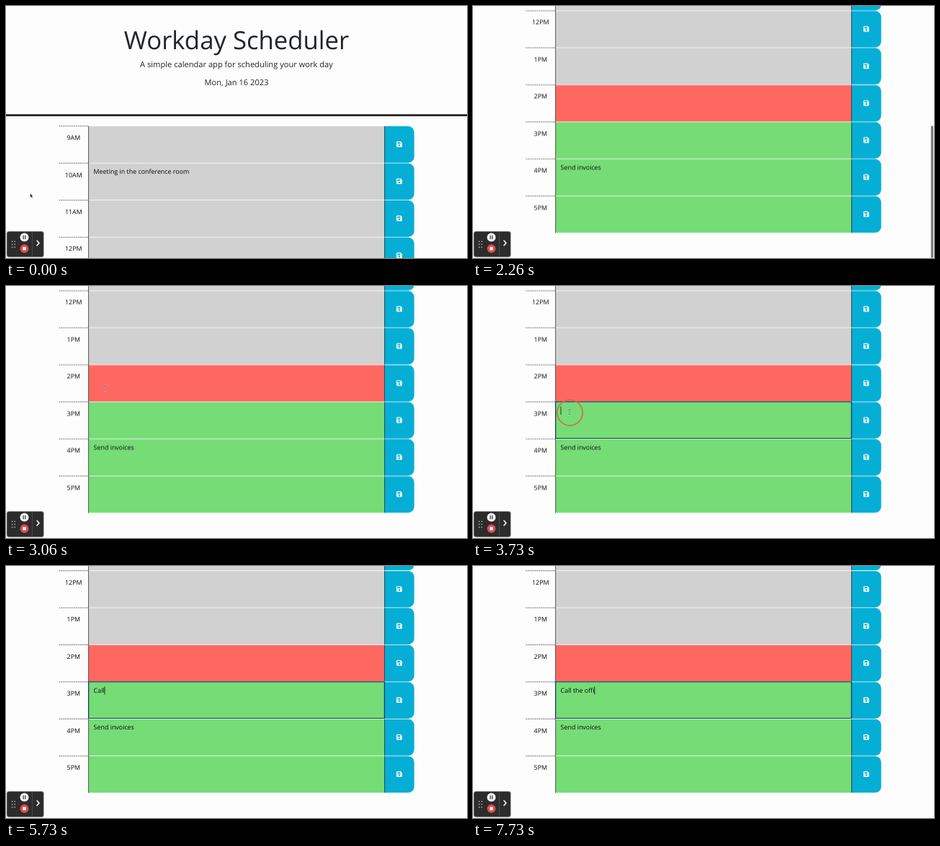
Recreate the animation shown at these times as an HTML page. Size 640x350 px, loop 8000 ms.

```html
<!DOCTYPE html>
<html lang="en">
<head>
<meta charset="utf-8">
<title>Workday Scheduler</title>
<style>
  html, body { margin: 0; width: 100%; height: 100%; overflow: hidden; background: #fdfdfd; }
  svg { display: block; width: 640px; height: 350px; }
  text {
    font: 8.9px "Open Sans", sans-serif;
    fill: #0a0a0a;
    text-rendering: geometricPrecision;
    white-space: pre;
  }
  .mid { text-anchor: middle; }
  h1, .title { font-size: 34.7px; fill: #212529; }
  .lead { font-size: 11.12px; fill: #212529; }

  #page, #arrow, #bar, #beam, #ring, #focus, #caret {
    animation: 8s linear infinite;
  }
  #page  { animation-name: scroll; animation-timing-function: step-end; }
  #arrow { animation-name: arrow; animation-timing-function: step-end; }
  #bar   { animation-name: bar; }
  #beam  { animation-name: beam-move, beam-show; animation-duration: 8s; animation-timing-function: ease-in-out, step-end; }
  #ring  { animation-name: ring; transform-origin: 134.5px 176px; }
  #focus { animation-name: focus; animation-timing-function: step-end; }
  #caret { animation-name: blink; animation-timing-function: step-end; }

  @keyframes scroll { 0% { transform: none; } 28.2%, 100% { transform: translateY(-314.6px); } }
  @keyframes arrow { 0% { opacity: 1; } 28.2%, 100% { opacity: 0; } }
  @keyframes bar {
    0%, 28.19% { opacity: 0; }
    28.2%, 34% { opacity: 1; }
    37.5%, 100% { opacity: 0; }
  }
  @keyframes beam-move {
    0%, 31% { transform: translate(141px, 236px); }
    38%, 40% { transform: translate(137.5px, 142px); }
    43.3%, 100% { transform: translate(134px, 175px); }
  }
  @keyframes beam-show { 0% { opacity: 0; } 31% { opacity: 1; } 67.5%, 100% { opacity: 0; } }
  @keyframes ring {
    0%, 44.9% { opacity: 0; transform: scale(.5); }
    45% { opacity: 1; transform: scale(.6); }
    46.4%, 48.2% { opacity: 1; transform: scale(1); }
    50.5%, 100% { opacity: 0; transform: scale(1); }
  }
  @keyframes focus { 0% { opacity: 0; } 45.8%, 100% { opacity: 1; } }
  @keyframes blink {
    0% { opacity: 0; }
    45.8% { opacity: 1; }
    51.6% { opacity: 0; }
    57.5% { opacity: 1; }
    61.6% { opacity: 0; }
    67.5%, 100% { opacity: 1; }
  }
</style>
</head>
<body>
<svg viewBox="0 0 640 350">
  <defs>
    <path id="save" fill="#fff" fill-rule="evenodd"
      d="M-3-3.9H1.9L3.9-1.9V3a.9 .9 0 0 1-.9 .9H-3a.9 .9 0 0 1-.9-.9V-3a.9 .9 0 0 1 .9-.9Z
         M-2.7-2.7V-.7H1.6V-2.7Z M0 .2a1.2 1.2 0 0 0 0 2.5a1.2 1.2 0 0 0 0-2.5Z"/>
  </defs>

  <g id="page">
    <text class="mid title" x="320" y="60.4">Workday Scheduler</text>
    <text class="mid lead" x="320" y="85">A simple calendar app for scheduling your work day</text>
    <text class="mid lead" x="320" y="110.3">Mon, Jan 16 2023</text>
    <rect y="150.3" width="640" height="2.8" fill="#212529"/>
    <g id="rows"></g>
  </g>

  <rect id="focus" x="114.6" y="160.9" width="410.8" height="50.6" rx=".8" fill="none" stroke="#0d3f68" stroke-width="1.2"/>
  <text id="typed" x="121.6" y="176.1"></text>
  <rect id="caret" x="121.6" y="167.3" width=".8" height="11.3" fill="#111"/>

  <circle id="ring" cx="134.5" cy="176" r="17.7" fill="none" stroke="#d8683a" stroke-width="1.6"/>

  <path id="arrow" d="M33.7 260.4v5.6l1.3-1.1 1 2 1-.5-.9-1.9h1.7Z" fill="#111" stroke="#fff" stroke-width=".5"/>
  <g id="beam" fill="none">
    <path d="M-1.6-3.7Q0-3.7 0-2.6V2.6Q0 3.7-1.6 3.7M1.6-3.7Q0-3.7 0-2.6M0 2.6Q0 3.7 1.6 3.7" stroke="#fff" stroke-opacity=".65" stroke-width="1.5"/>
    <path d="M-1.6-3.7Q0-3.7 0-2.6V2.6Q0 3.7-1.6 3.7M1.6-3.7Q0-3.7 0-2.6M0 2.6Q0 3.7 1.6 3.7" stroke="#333" stroke-width=".6"/>
  </g>

  <rect id="bar" x="635.8" y="166.3" width="3.2" height="183.5" rx="1.6" fill="#7d7d7d"/>

  <g id="recorder">
    <rect x="1" y="313" width="51.4" height="35.8" rx="3" fill="#2c2c2c" stroke="#bbb" stroke-width=".5"/>
    <path d="M36.4 313.4V348.4" stroke="#555" stroke-width=".8"/>
    <path d="M8.6 327h.01M12.2 327h.01M8.6 331h.01M12.2 331h.01M8.6 335h.01M12.2 335h.01"
      stroke="#bbb" stroke-width="1.7" stroke-linecap="round"/>
    <circle cx="25.5" cy="321.3" r="6" fill="#f4f4f4"/>
    <path d="M24.2 318.8v5M26.8 318.8v5" stroke="#2c2c2c" stroke-width="1.2"/>
    <circle cx="25.5" cy="337" r="6" fill="#e0484c"/>
    <rect x="23.3" y="334.8" width="4.4" height="4.4" rx=".5" fill="#fff"/>
    <path d="M42.6 325.4l3.4 3.8-3.4 3.8" fill="none" stroke="#fff" stroke-width="1.5"/>
  </g>
</svg>

<script>
  const PITCH = 51.46, TOP = 166.4, LOOP = 8000, TEXT_X = 121.6;
  const hours = ['9AM', '10AM', '11AM', '12PM', '1PM', '2PM', '3PM', '4PM', '5PM'];
  const notes = { '10AM': 'Meeting in the conference room', '4PM': 'Send invoices' };
  const current = 5;
  const byId = id => document.getElementById(id);

  function row(hour, i) {
    const y = TOP + i * PITCH, top = y + .7, h = PITCH - .8;
    const fill = i < current ? '#d1d1d1' : i === current ? '#ff6861' : '#76dc76';
    return `
      <path d="M73.5 ${y + .4}H114.5" stroke="#333" stroke-width=".8" stroke-dasharray="1.6 1"/>
      <text class="mid" x="93.8" y="${y + 19.7}">${hour}</text>
      <rect x="114.6" y="${top}" width="411" height="${h}" fill="${fill}"/>
      <path d="M114.6 ${y + .3}v${PITCH}" stroke="#333" stroke-width=".8"/>
      <text x="${TEXT_X}" y="${y + 15.4}">${notes[hour] || ''}</text>
      <path d="M525.6 ${top}H558.4a8.3 8.3 0 0 1 8.3 8.3v${h - 16.6}a8.3 8.3 0 0 1-8.3 8.3H525.6Z" fill="#05aed5"/>
      <path d="M525.6 ${top}v${h}" stroke="#222" stroke-width=".8"/>
      <use href="#save" x="546" y="${y + 25.6}"/>`;
  }
  byId('rows').innerHTML = hours.map(row).join('');

  const phrase = 'Call the offi';
  const keyTimes = [5400, 5530, 5600, 5715, 5930, 6200, 6330, 6460, 6600, 7060, 7260, 7530, 7715];
  const typed = byId('typed'), caret = byId('caret');
  let start, shown = -1;

  function tick(now) {
    start ??= now;
    const t = (now - start) % LOOP;
    const count = keyTimes.filter(k => k <= t).length;
    if (count !== shown) {
      shown = count;
      typed.textContent = phrase.slice(0, count);
      caret.setAttribute('x', TEXT_X + (count ? typed.getComputedTextLength() : 0));
    }
    requestAnimationFrame(tick);
  }
  requestAnimationFrame(tick);
</script>
</body>
</html>
```
